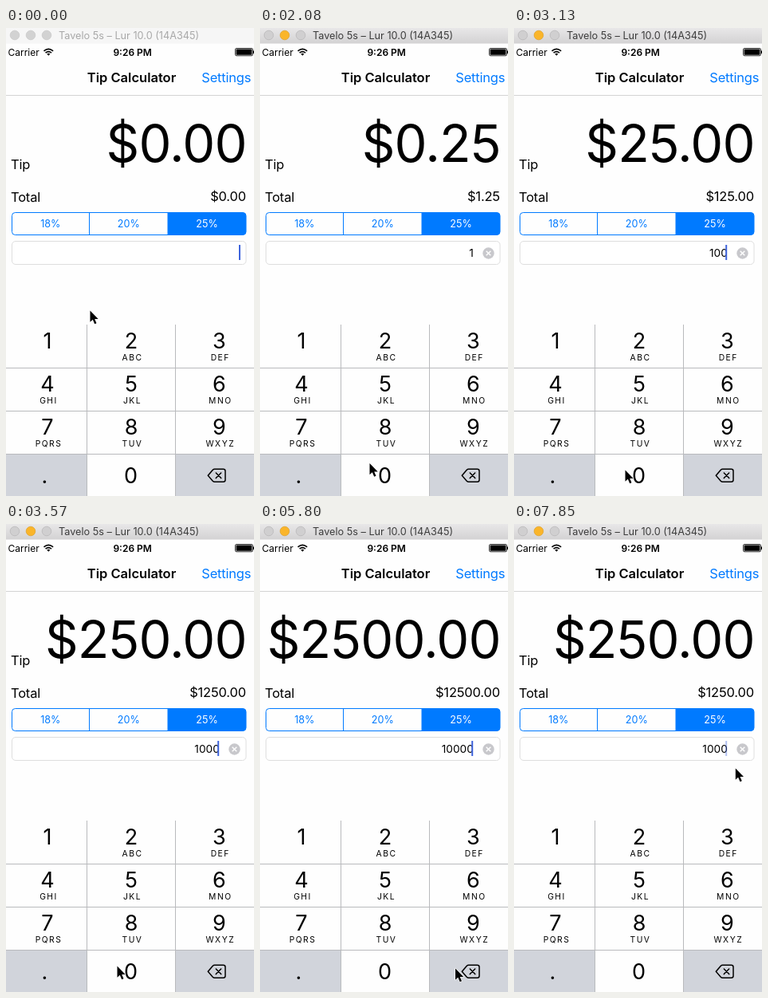
Recreate the animation shown at these times as an HTML page. Size 311 px wide and 587 px high, loop 8000 ms.

```html
<!DOCTYPE html>
<html lang="en">
<head>
<meta charset="utf-8">
<title>Tip Calculator</title>
<style>
  html, body { margin: 0; width: 100%; height: 100%; overflow: hidden; background: #fefefe; }
  svg { display: block; width: 100%; height: 100%; }
  text { font-family: Inter, Roboto, sans-serif; font-optical-sizing: none; white-space: pre; }
  .body { font-size: 16.5px; letter-spacing: -.2px; }
  .status { font-size: 12px; }
  .bold { font-weight: 600; }
  .end { text-anchor: end; }
  .mid { text-anchor: middle; }
  .blue { fill: #007aff; }
  .amount { font-size: 65px; letter-spacing: -.8px; }
  .segment { font-size: 12.6px; }
  .digit { font-size: 27px; }
  .letters { font-size: 10.3px; letter-spacing: 1.5px; }
  .lines { stroke: #b9babd; fill: none; }
</style>
</head>
<body>
<svg viewBox="0 0 311 587">
  <defs>
    <linearGradient id="chrome" x2="0" y2="1">
      <stop stop-color="#e8e7e8"/><stop offset="1" stop-color="#d3d2d3"/>
    </linearGradient>
  </defs>
  <rect width="311" height="587" fill="#fefefe"/>

  <rect id="titleBar" width="311" height="19.5"/>
  <g id="lights" stroke-width=".7">
    <circle cx="11" cy="9" r="5.8"/><circle cx="31" cy="9" r="5.8"/><circle cx="51" cy="9" r="5.8"/>
  </g>
  <text id="windowTitle" x="66" y="14" font-size="12.7">Tavelo 5s – Lur 10.0 (14A345)</text>

  <text class="status" x="2.5" y="35">Carrier</text>
  <g fill="none" stroke="#000" stroke-width="1.7">
    <path d="M47.5 28.9Q53.3 24 59.1 28.9M49.6 31.2Q53.3 28 57 31.2"/>
    <path d="M51.3 32.6Q53.3 31 55.3 32.6L53.3 34.8Z" fill="#000" stroke="none"/>
  </g>
  <text class="status bold mid" x="158.7" y="35">9:26 PM</text>
  <rect x="287.5" y="25.5" width="22" height="9.3" rx="1.6" fill="none" stroke="#000" stroke-width=".8"/>
  <rect x="288.6" y="26.5" width="19.8" height="7.3" rx=".6"/>
  <rect x="310" y="28.5" width="1" height="3.4"/>

  <text class="bold mid" x="157.5" y="68" font-size="16.5">Tip Calculator</text>
  <text class="body blue" x="245.3" y="68">Settings</text>
  <path class="lines" d="M0 84.5H311" style="stroke:#d3d3d3"/>

  <text id="tipLabel" class="body" x="6" y="176.5">Tip</text>
  <text id="tip" class="amount end" x="301.7" y="168"></text>
  <text class="body" x="6" y="218.3">Total</text>
  <text id="total" class="body end" x="300.9" y="217.3"></text>

  <path d="M202.5 231.5H297a4 4 0 0 1 4 4V255.500a4 4 0 0 1-4 4H202.500Z" class="blue"/>
  <rect x="7.500" y="231.500" width="293.500" height="28" rx="4" fill="none" stroke="#007aff"/>
  <path d="M104.500 231.500V259.500" stroke="#007aff"/>
  <g class="segment mid">
    <text class="blue" x="55.800" y="250">18%</text>
    <text class="blue" x="153.800" y="250">20%</text>
    <text fill="#fff" x="252" y="250">25%</text>
  </g>

  <rect x="7.500" y="267.500" width="293.500" height="29" rx="4.500" fill="#fff" stroke="#dedede"/>
  <text id="entry" class="end" x="267.800" y="287" font-size="13.700"></text>
  <rect id="caret" y="272" width="2" height="19" fill="#3f64dc"/>
  <g id="clear">
    <circle cx="286.500" cy="282.500" r="7.200" fill="#c8c8cc"/>
    <path d="M283.700 279.700l5.600 5.600m0-5.600l-5.600 5.600" stroke="#fff" stroke-width="1.400"/>
  </g>

  <path d="M0 534.500H101.500V587H0Z" fill="#d1d4db"/>
  <rect id="deleteKey" x="212.500" y="534.500" width="98.500" height="52.500" fill="#d1d4db"/>
  <rect id="pressed" fill="#d1d4db"/>
  <path class="lines" d="M0 426.500H311M0 480.500H311M0 534.500H311M101.500 372V587M212.500 372V587"/>
  <g id="keys" class="mid"></g>
  <g fill="none" stroke="#000" stroke-width="1.500" stroke-linejoin="round" stroke-linecap="round">
    <path d="M253.300 561.300l6-7q1-1 2.300-1H272.500q2.500 0 2.500 2.500v11q0 2.500-2.500 2.500H261.600q-1.300 0-2.300-1Z"/>
    <path d="M263.300 558l6.400 6.600m0-6.600l-6.400 6.600"/>
  </g>

  <path id="cursor" d="M0 0V14.300L3.300 11.200L5.700 16.700L8 15.700L5.700 10.400H10.200Z"
        stroke="#fff" stroke-width="1.200" paint-order="stroke" stroke-linejoin="round"/>
</svg>
<script>
const LOOP = 8000, TICK = LOOP / 54;
const el = id => document.getElementById(id);

// Every track holds [tick, value...] rows.
const values = [[0, 0], [10, 1], [18, 10], [21, 100], [24, 1000], [30, 10000], [41, 1000]];
const presses = [[0, ''], [9, '1'], [10, ''], [17, '0'], [18, ''], [20, '0'], [21, ''],
  [23, '0'], [24, ''], [41, 'delete'], [42, '']];
const caretAlpha = [[0, 1], [3, .5], [4, 0], [6, .5], [7, 1], [13, .5], [14, 0], [16, .5], [17, 1],
  [27, .5], [28, 0], [30, 1], [35, .5], [36, 0], [38, .5], [39, 1], [46, .5], [47, 0],
  [49, .5], [50, 1], [53, .4]];
const labelAlpha = [[0, 1], [31, .66], [32, 0], [42, .66], [43, 1]];
const pointer = [[2, 105.5, 354.5], [8, 59.5, 397], [9, 59.5, 397], [10, 98, 498], [14, 137.5, 546],
  [15, 137.5, 546], [17, 139.5, 554.5], [34, 139.5, 554.5], [39, 245, 557.5], [43, 245, 557.5],
  [47, 171, 338], [48, 171, 338], [53, 277.8, 306.5]];
const keyBoxes = { 1: [0, 372, 101.5, 54.5], 0: [101.5, 534.5, 111, 52.5] };

const held = (track, tick) => track.filter(row => row[0] <= tick).pop()[1];

function pointerAt(tick) {
  const next = pointer.findIndex(row => row[0] >= tick);
  if (next < 1) return pointer[0].slice(1);
  const [t0, x0, y0] = pointer[next - 1], [t1, x1, y1] = pointer[next];
  const p = (tick - t0) / (t1 - t0), eased = p * p * (3 - 2 * p);
  return [x0 + (x1 - x0) * eased, y0 + (y1 - y0) * eased];
}

function buildKeys() {
  const columns = [52, 157, 267.3];
  const letters = ['', 'ABC', 'DEF', 'GHI', 'JKL', 'MNO', 'PQRS', 'TUV', 'WXYZ'];
  const label = (cls, x, y, s) => `<text class="${cls}" x="${x}" y="${y}">${s}</text>`;
  el('keys').innerHTML = letters.map((s, i) => {
    const x = columns[i % 3], y = 402 + 54 * Math.floor(i / 3);
    return label('digit', x, y, i + 1) + label('letters', x + 1.5, y + 15, s);
  }).join('') + label('digit', 48.5, 571, '.') + label('digit', 156.5, 571, '0');
}

function drawWindow(active) {
  el('titleBar').setAttribute('fill', active ? 'url(#chrome)' : '#f6f6f6');
  el('windowTitle').setAttribute('fill', active ? '#3c3c3c' : '#a8a8a8');
  [...el('lights').children].forEach((light, i) => {
    const lit = active && i === 1;
    light.setAttribute('fill', lit ? '#fab52a' : active ? '#d0cfd0' : '#d2d2d2');
    light.setAttribute('stroke', lit ? '#dd9f2a' : active ? '#b6b5b6' : '#c8c8c8');
  });
}

function draw(tick) {
  const value = held(values, tick), key = held(presses, tick), box = keyBoxes[key];
  drawWindow(tick >= 9);
  el('tip').textContent = '$' + (value * .25).toFixed(2);
  el('total').textContent = '$' + (value * 1.25).toFixed(2);
  el('entry').textContent = value || '';
  el('clear').style.opacity = value ? 1 : 0;
  el('tipLabel').style.opacity = held(labelAlpha, tick);
  el('caret').setAttribute('x', value ? 265.2 : 292);
  el('caret').style.opacity = held(caretAlpha, tick);
  el('deleteKey').setAttribute('fill', key === 'delete' ? '#fefefe' : '#d1d4db');
  el('pressed').style.opacity = box ? 1 : 0;
  if (box) ['x', 'y', 'width', 'height'].forEach((name, i) => el('pressed').setAttribute(name, box[i]));
  el('cursor').setAttribute('transform', `translate(${pointerAt(tick)})`);
}

let shown = -1;
const start = performance.now();
function frame() {
  const time = (performance.now() - start) % LOOP;
  const tick = Math.min(53, Math.floor((time + 8) / TICK));
  if (tick !== shown) draw(shown = tick);
  requestAnimationFrame(frame);
}
buildKeys();
frame();
</script>
</body>
</html>
```
